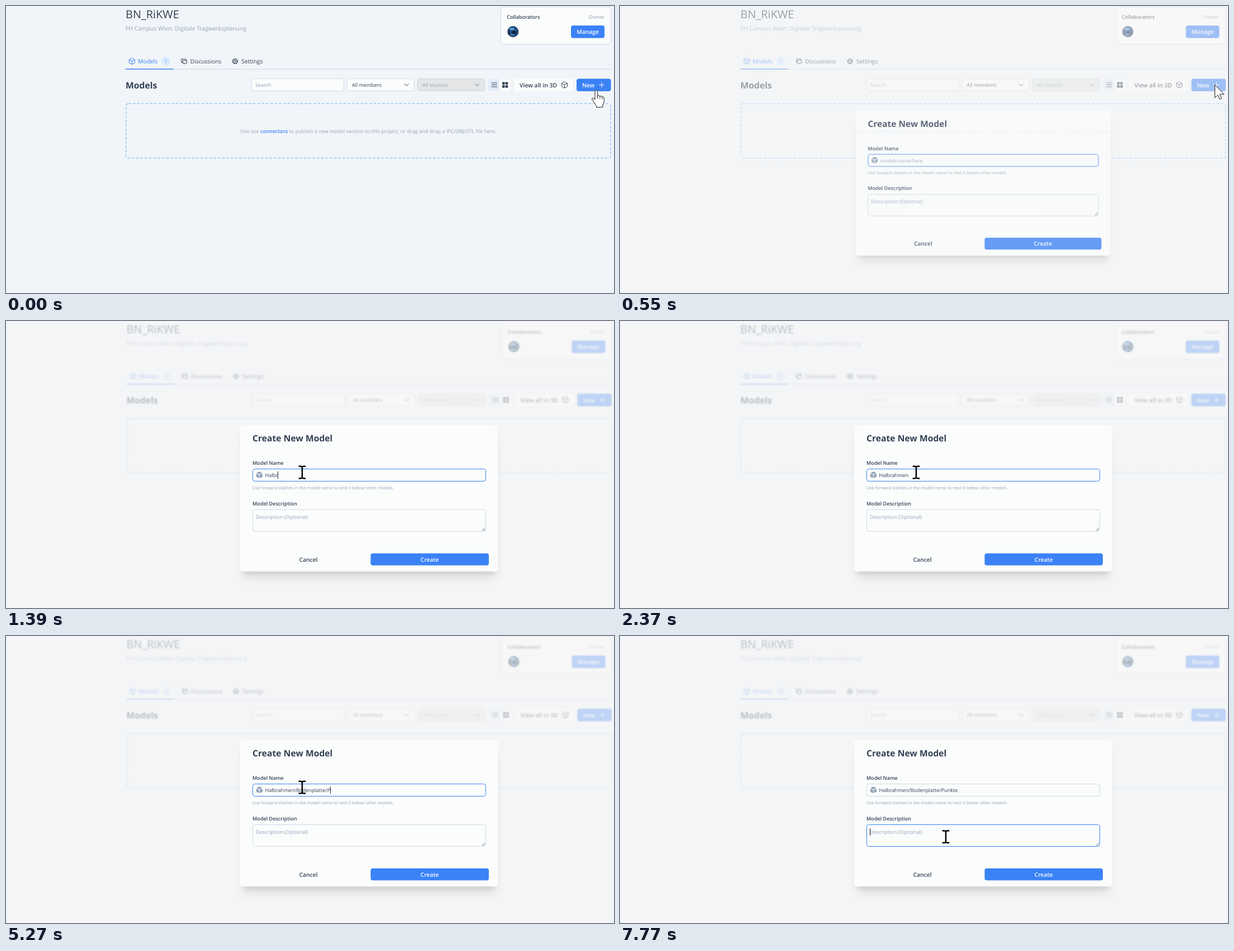
Recreate the animation shown at these times as an HTML page. Size 1088 by 515 pixels, loop 8000 ms.

```html
<!DOCTYPE html>
<html lang="en">
<head>
<meta charset="utf-8">
<title>Create new model</title>
<style>
  html, body { margin: 0; width: 100%; height: 100%; overflow: hidden; background: #f1f5f9; }
  svg { display: block; width: 1088px; height: 515px; }
  text { font: 9.05px "Open Sans", "Noto Sans", sans-serif; fill: #334155; text-rendering: geometricPrecision; white-space: pre; }
  text.body { font-size: 10.4px; }
  text.label { font-weight: 600; }
  text.button { font-size: 10.3px; font-weight: 600; }
  text.heading { font-size: 15.7px; font-weight: 700; }
  text.muted { fill: #94a3b8; }
  text.white { fill: #fff; }
  text.blue, tspan.blue { fill: #3b82f6; }
  tspan.blue { font-weight: 600; }
  .mid { text-anchor: middle; }
  .field { fill: #fbfcfc; stroke: #cfd8e3; }
  .primary { fill: #3b82f6; }
  .line { fill: none; stroke: #334155; stroke-linecap: round; stroke-linejoin: round; }
  .pointer { fill: #fff; stroke: #111; stroke-width: .95; stroke-linejoin: round; }
</style>
</head>
<body>
<svg viewBox="0 0 1088 515">
  <defs>
    <radialGradient id="portrait" cx=".55" cy=".45" r=".6">
      <stop offset="0" stop-color="#2f78bd"/>
      <stop offset=".6" stop-color="#1d4674"/>
      <stop offset="1" stop-color="#101a38"/>
    </radialGradient>
    <filter id="soft" x="-20%" y="-20%" width="140%" height="140%"><feGaussianBlur stdDeviation="8"/></filter>
    <filter id="tight" x="-20%" y="-20%" width="140%" height="140%"><feGaussianBlur stdDeviation="3"/></filter>
    <path id="cube" d="M0-5.3 5-2.6V3L0 5.7-5 3V-2.6ZM-5-2.6 0 .1 5-2.6M0 .1V5.7"/>
    <path id="chevron" d="M-3.6-1.8 0 1.8 3.6-1.8"/>
  </defs>
  <rect width="1088" height="515" fill="#f1f5f9"/>

  <g id="page">
    <text x="214" y="22" style="font-size:19.9px">BN_RiKWE</text>
    <text class="body muted" x="214" y="44.3">FH Campus Wien: Digitale Tragwerksplanung</text>

    <rect class="field" x="885.5" y="1.5" width="197" height="67" rx="6"/>
    <text class="label" x="896.3" y="23.3">Collaborators</text>
    <text class="muted" x="1071" y="23.3" text-anchor="end">Owner</text>
    <circle cx="907.3" cy="46" r="10" fill="url(#portrait)"/>
    <ellipse cx="905" cy="41" rx="4.5" ry="2" fill="#5b9fd6"/>
    <ellipse cx="909" cy="47" rx="4" ry="3" fill="#16213f"/>
    <ellipse cx="906" cy="52" rx="4" ry="1.6" fill="#4a86c0"/>
    <rect class="primary" x="1011" y="35" width="60" height="22.5" rx="4"/>
    <text class="button white mid" x="1041" y="49.8">Manage</text>

    <path d="M214 113.5H1082.5" stroke="#cbd5e1"/>
    <path d="M214 113.2H299.5" stroke="#3b82f6" stroke-width="1.6"/>
    <use href="#cube" class="line" x="225.3" y="99" style="stroke:#3b82f6"/>
    <text class="body blue" x="236" y="103">Models</text>
    <circle cx="286" cy="99" r="8" fill="#dbeafe"/>
    <text class="blue mid" x="286" y="101.8" style="font-size:7.8px">1</text>
    <path class="line" d="M316 101.5H314V95H322V97M316.5 97.5H323.5V102.5H321L319 104.5V102.5H316.5Z"/>
    <text class="body" x="329.8" y="103" style="font-size:10.2px">Discussions</text>
    <g class="line" transform="translate(410 99.2)">
      <circle r="4.5" stroke-width="1.3" stroke-dasharray="2.1 1.43" stroke-linecap="butt"/>
      <circle r="3.7"/><circle r="1.5"/>
    </g>
    <text class="body" x="421.2" y="103">Settings</text>

    <text class="heading" x="214" y="148.4">Models</text>
    <rect class="field" x="439.5" y="130.5" width="165" height="22" rx="4"/>
    <text class="muted" x="446" y="145.3">Search</text>
    <rect class="field" x="610.5" y="130.5" width="120" height="22" rx="4"/>
    <text x="619" y="145">All members</text>
    <use href="#chevron" class="line" x="716.5" y="141.7"/>
    <rect class="field" x="736.5" y="130.5" width="120" height="22" rx="4" style="fill:#e3e5e7"/>
    <text class="muted" x="745.3" y="145">All sources</text>
    <use href="#chevron" class="line" x="842.8" y="141.7" style="stroke:#64748b"/>
    <rect x="863" y="131" width="41" height="21" rx="4" fill="#e3ecf8"/>
    <rect x="883" y="131.5" width="20.5" height="20.5" rx="4" fill="#fbfcfc"/>
    <path class="line" d="M869 138H878.5M869 141.5H878.5M869 145H878.5"/>
    <g fill="#334155">
      <rect x="888" y="136.5" width="4.6" height="4.6" rx="1"/>
      <rect x="893.6" y="136.5" width="4.6" height="4.6" rx="1"/>
      <rect x="888" y="142.1" width="4.6" height="4.6" rx="1"/>
      <rect x="893.6" y="142.1" width="4.6" height="4.6" rx="1"/>
    </g>
    <rect x="909" y="130.5" width="106.5" height="22.5" rx="4" fill="#fbfcfc"/>
    <text class="button" x="919" y="145.5" style="font-size:10.5px">View all in 3D</text>
    <use href="#cube" class="line" x="999.5" y="141.5"/>
    <rect id="newButton" class="primary" x="1021" y="130.5" width="61.5" height="22.5" rx="4"/>
    <text class="button white" x="1031" y="145.5">New</text>
    <path class="line" d="M1061.5 141.7H1070.5M1066 137.2V146.2" style="stroke:#fff"/>

    <rect x="214.8" y="175.3" width="867.2" height="97.7" rx="4" fill="none" stroke="#93c5fd" stroke-width="1.5" stroke-dasharray="4.8 2.9"/>
    <text class="muted mid" x="648.5" y="227.6" style="font-size:9.16px">Use our <tspan class="blue">connectors</tspan> to publish a new model version to this project, or drag and drop a IFC/OBJ/STL file here.</text>
  </g>

  <rect id="veil" width="1088" height="515" fill="#f5f5f5"/>

  <g id="dialog">
    <rect x="423" y="207" width="453.5" height="254.5" rx="5" opacity=".09" filter="url(#soft)"/>
    <rect x="424" y="197" width="451.5" height="256.5" rx="5" opacity=".07" filter="url(#tight)"/>
    <rect x="419" y="187" width="461.5" height="262.5" rx="5" fill="#fbfcfc"/>
    <text class="heading" x="441" y="215.7">Create New Model</text>

    <text class="label" x="441" y="258">Model Name</text>
    <rect id="nameField" class="field" x="441.5" y="265.5" width="417" height="22" rx="4"/>
    <path d="M453.5 270.2 458.7 272.6 453.5 275.2 448.3 272.6ZM447.9 273.7 453 276.2V282L447.9 279.4ZM459.1 273.7 454 276.2V282L459.1 279.4Z" fill="#94a3b8"/>
    <text id="nameText" x="463.5" y="279.6"></text>
    <text class="muted" x="441" y="301.6" style="font-size:7.76px">Use forward slashes in the model name to nest it below other models.</text>

    <text class="label" x="441" y="330.5">Model Description</text>
    <rect id="infoField" class="field" x="441.5" y="338.5" width="417" height="39" rx="4"/>
    <text class="muted" x="447" y="354.6" style="font-size:9.15px">Description (Optional)</text>
    <path d="M851.5 376.5 857 371M854.5 376.5 857 374" stroke="#64748b" stroke-width=".9"/>

    <text class="button mid" x="541.2" y="431.6">Cancel</text>
    <rect class="primary" x="652.5" y="417" width="211.5" height="21.5" rx="4"/>
    <text class="button white mid" x="758.2" y="431.6">Create</text>
    <path id="caret" stroke="#1e293b"/>
  </g>

  <g id="hand" class="pointer">
    <path d="M-2 17V2.4a2.3 2.3 0 0 1 4.6 0V10.2q2.2-1.6 4.2.6 2.4-1 4 1.2 3.4-.6 3.4 3V20q0 4-2.4 7V30.6H.4V28q-2-2-4-6l-3.6-5q-1-2.6 1.5-3 2 0 3.7 3Z"/>
    <path d="M2.6 10V15M6.8 11V15.5M10.8 12.2V16" fill="none"/>
  </g>
  <path id="arrow" class="pointer" d="M0 0V23.2L5.3 18.3 8.7 25.8 12.1 24.3 8.8 16.8H16.5Z"/>
  <path id="beam" d="M-6.3-10.8H-3Q0-10.8 0-9 0-10.8 3-10.8H6.3M-6.3 10.8H-3Q0 10.8 0 9 0 10.8 3 10.8H6.3M0-9.5V9.5" fill="none" stroke="#000" stroke-width="2.5"/>
</svg>
<script>
  const LOOP = 8000;
  const NAME = "Halbrahmen/Bodenplatte/Punkte";
  const KEY_TIMES = [
    760, 970, 970, 1180, 1390, 1500, 1610, 1720, 1830, 1940,
    2480, 2800, 2910, 3020, 3130, 3230, 3460, 3570, 3680, 3890, 4000, 4110,
    4950, 5270, 6030, 6140, 6250, 6480, 7010
  ];
  const CARET_ON = 420;
  const DESCRIPTION_FOCUS = 7770;

  // [time, dialog progress, page blur]
  const FADE = [[0, 0, 0], [440, 0.12, 0], [550, 0.77, 0], [660, 0.97, 1], [760, 1, 1]];
  // [time, shape, x, y]
  const POINTER = [
    [0, "hand", 1056, 151], [110, "hand", 1060, 146], [220, "hand", 1064, 141],
    [440, "arrow", 1064.5, 141.5], [760, "beam", 530, 271.6],
    [7220, "arrow", 563.5, 391.5], [7330, "arrow", 565, 408], [7440, "arrow", 575, 388],
    [7550, "beam", 584, 366], [7660, "beam", 583, 360.3]
  ];

  const el = id => document.getElementById(id);
  const set = (id, attrs) => {
    for (const key in attrs) el(id).setAttribute(key, attrs[key]);
  };
  const show = (id, on) => { el(id).style.display = on ? "" : "none"; };
  const current = (steps, t) => steps.findLast(step => step[0] <= t);
  const focus = (id, on) => { el(id).style.stroke = on ? "#3b82f6" : ""; };

  function drawFade(t) {
    const [, progress, blur] = current(FADE, t);
    const scale = 0.95 + 0.05 * progress;
    set("page", { transform: `translate(${progress ? 1.5 : 0} 0)` });
    el("page").style.filter = blur ? `blur(${blur}px)` : "none";
    set("veil", { opacity: 0.7 * progress });
    set("dialog", {
      opacity: progress,
      transform: `translate(649.75 318.25) scale(${scale}) translate(-649.75 -318.25)`
    });
    const hovered = t >= 110 && t < 440;
    set("newButton", { stroke: hovered ? "#60a5fa" : "none" });
  }

  function drawFields(t) {
    const typed = KEY_TIMES.filter(time => time <= t).length;
    const inDescription = t >= DESCRIPTION_FOCUS;
    const label = el("nameText");
    label.textContent = typed ? NAME.slice(0, typed) : "model/name/here";
    label.setAttribute("class", typed ? "" : "muted");
    label.setAttribute("y", typed ? 279.6 : 280.4);

    focus("nameField", !inDescription);
    focus("infoField", inDescription);
    const blinkOn = typed > 0 && t - KEY_TIMES[typed - 1] < CARET_ON;
    show("caret", inDescription || blinkOn);
    if (inDescription) set("caret", { d: "M447.5 345V358" });
    else if (blinkOn) {
      const x = Math.floor(463.5 + label.getComputedTextLength()) + 0.5;
      set("caret", { d: `M${x} 270V283` });
    }
  }

  function drawPointer(t) {
    const [, shape, x, y] = current(POINTER, t);
    for (const id of ["hand", "arrow", "beam"]) show(id, id === shape);
    set(shape, { transform: `translate(${x} ${y})` });
  }

  function render(t) {
    drawFade(t);
    drawFields(t);
    drawPointer(t);
  }

  const start = performance.now();
  function tick(now) {
    render(Math.max(0, now - start) % LOOP);
    requestAnimationFrame(tick);
  }
  render(0);
  requestAnimationFrame(tick);
</script>
</body>
</html>
```
